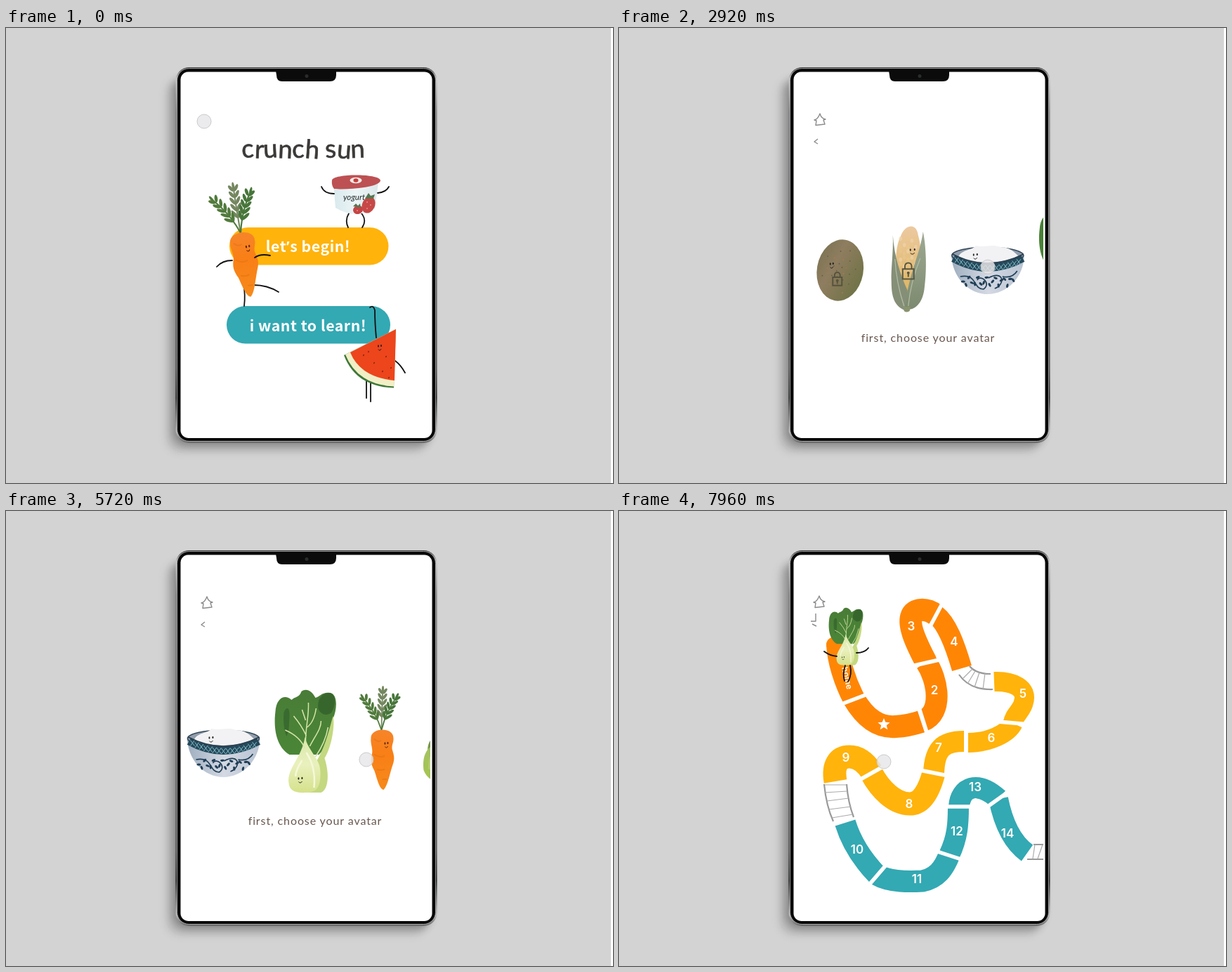
An HTML page that plays this animation: 864x648 px, repeating every 8000 ms.

```html
<!DOCTYPE html>
<html lang="en">
<head>
<meta charset="utf-8">
<style>
html, body { margin: 0; width: 100%; height: 100%; overflow: hidden; background: #d3d3d3; }
svg { display: block; width: 100vw; height: 100vh; }
.line { fill: none; stroke: #111; stroke-width: 1.8; stroke-linecap: round; stroke-linejoin: round; }
.icon { fill: none; stroke: #8b8b8b; stroke-width: 1.4; stroke-linejoin: round; }
.title { font: 400 36.5px Lato, sans-serif; fill: #3c3a39; stroke: #3c3a39; stroke-width: .7; }
.button { font: 700 21.3px "Noto Sans CJK SC", "Noto Sans CJK JP", "Noto Sans CJK", "Open Sans", sans-serif; letter-spacing: .5px; fill: #fff; text-anchor: middle; }
.mark { font-family: "Open Sans", sans-serif; }
.prompt { font: 400 16px Lato, sans-serif; letter-spacing: .9px; fill: #68574f; text-anchor: middle; }
.num { font: 600 17px Inter, sans-serif; fill: #fff; text-anchor: middle; }
</style>
</head>
<body>
<svg id="stage" viewBox="0 0 864 648" preserveAspectRatio="none"></svg>
<script>
const LOOP = 8000;
const path = (d, fill, more = "") => `<path d="${d}" fill="${fill}" ${more}/>`;
const stroke = (d, color, width, more = "") =>
  `<path d="${d}" fill="none" stroke="${color}" stroke-width="${width}" ${more}/>`;
const line = d => `<path class="line" d="${d}"/>`;
const icon = d => `<path class="icon" d="${d}"/>`;
const oval = (x, y, rx, ry, fill, turn = 0, more = "") =>
  `<ellipse cx="${x}" cy="${y}" rx="${rx}" ry="${ry}" fill="${fill}" transform="rotate(${turn} ${x} ${y})" ${more}/>`;
const group = (id, content, transform = "") => `<g id="${id}" transform="${transform}">${content}</g>`;
const text = (cls, x, y, words, more = "") => `<text class="${cls}" x="${x}" y="${y}" ${more}>${words}</text>`;
const gradient = (id, stops, dir = 'x2="0" y2="1"') => `<linearGradient id="${id}" ${dir}>` +
  stops.map(([at, color]) => `<stop offset="${at}" stop-color="${color}"/>`).join("") + "</linearGradient>";

const face = (x, y, gap = 5, color = "#222") =>
  oval(x, y, 1, 1.7, color) + oval(x + gap, y - .6, 1, 1.7, color) +
  stroke(`M${x} ${y + 4.5}q${gap / 2} 3.5 ${gap} -.5`, color, 1);
const lock = (x, y, s, color) =>
  stroke(`M${x - s} ${y - s * .6}h${2 * s}v${s * 1.8}h${-2 * s}zM${x - s * .6} ${y - s * .6}v${-s * .5}a${s * .6} ${s * .6} 0 0 1 ${s * 1.2} 0v${s * .5}M${x} ${y + s * .2}v${s * .6}`, color, 2) +
  oval(x, y + s * .1, 2, 2, color);

// A stem from the origin to (x, y) with pairs of narrow leaves along it.
function sprig(x, y, color) {
  const heading = Math.atan2(y, x) * 180 / Math.PI;
  let out = stroke(`M0 0Q${x * .3} ${y * .55} ${x} ${y}`, color, 1.8);
  for (let i = 0; i < 5; i++) {
    const t = .3 + i * .14;
    const px = 2 * t * (1 - t) * x * .3 + t * t * x;
    const py = 2 * t * (1 - t) * y * .55 + t * t * y;
    for (const side of [-1, 1]) {
      const turn = heading + side * 33, a = turn * Math.PI / 180;
      out += oval(px + 6 * Math.cos(a), py + 6 * Math.sin(a), 6.3 - i * .4, 2, color, turn);
    }
  }
  return out + oval(x, y, 5, 1.6, color, heading);
}

const carrot = id =>
  group(id, sprig(2, -58, "#74875f") + sprig(-27, -47, "#517b3c") + sprig(22, -48, "#47763a")) +
  path("M-15 12C-16-4 17-5 17 11C18 18 13 22 16 30C20 42 17 46 14 56C10 70 8 80 3 85C-3 84-6 70-10 58C-14 50-16 45-14 36C-11 28-16 20-15 12Z", "url(#carrotSkin)") +
  stroke("M-10 35q8 5 14 2M-6 56q6 2 10 0M2 70h5M-10 13q5 5 9 2", "#dc6f12", 2, 'opacity=".45" stroke-linecap="round"') +
  face(5, 19, 4, "#5a2410");

const bokChoy =
  path("M488 347C466 334 466 302 468 286C469 267 481 260 491 269C496 264 502 266 505 257C512 252 520 256 525 266C532 264 535 257 546 259C557 261 556 282 550 296C550 315 545 333 530 347Z", "url(#leaf)") +
  path("M529 282C527 267 535 259 546 259C556 262 553 281 547 288C540 292 533 290 529 282Z", "#37662d") +
  path("M480 287c4-10 9-7 8 7c-1 14 0 18-4 27c-4-9-5-23-4-34Z", "#396a2f") +
  path("M526 357C537 340 543 318 550 292C553 302 549 335 538 352C545 373 544 397 533 401H510Z", "#c3d880") +
  path("M487 387C484 367 506 351 510 322C515 342 532 353 532 371C533 394 526 401 512 401C495 402 488 398 487 387Z", "url(#stalk)") +
  stroke("M511 330C511 306 516 292 515 273M512 320Q505 305 494 292M513 308Q523 301 526 281M510 338Q503 321 482 312M517 335C526 318 533 310 533 299M525 350Q539 330 543 308M511 298L506 283", "#d6e5a9", 1.5) +
  stroke("M512 344Q526 365 523 394M506 355Q496 371 497 378", "#f5f8d9", 2.5) +
  face(501, 381, 5);

const potato =
  oval(325, 345, 33, 44, "url(#potatoSkin)", 10) +
  [...Array(24)].map((_, i) => oval(325 + (i + 3) * Math.sin(i * 2.4), 345 + 1.35 * (i + 3) * Math.cos(i * 2.4), .9, .9, i % 3 ? "#675d43" : "#b07752")).join("") +
  face(311, 336, 4) + lock(321, 359, 6.5, "#57533f");

const corn =
  path("M411 297C417 279 434 277 436 295C443 318 440 350 431 380H412C402 350 402 314 411 297Z", "url(#cornSkin)") +
  [...Array(30)].map((_, i) => oval(411 + i % 5 * 5.4, 300 + (i / 5 | 0) * 9 + i % 2 * 3, 2.4, 3, i % 3 ? "#e9c88c" : "#f1d6af", 0, 'opacity=".6"')).join("") +
  path("M400 295C402 325 411 352 421 374L420 403C402 398 398 382 398 362C397 342 401 322 400 295Z", "#858f78") +
  path("M443 290C439 322 422 350 417 401C433 403 443 390 445 370C449 342 447 309 443 290Z", "url(#husk)") +
  path("M415 397h10l-1 6q-5 3-8 0Z", "#89936f") +
  stroke("M439 328Q425 363 422 396M403 329Q405 363 416 396", "#b4bda4", 1.2) +
  face(425, 316, 6) + lock(422, 348, 8, "#59563f");

function makeBowl() {
  let lattice = "", flowers = "";
  for (let i = 0; i < 15; i++) {
    const x = 488 + i * 6.3, y = 329 + 13 * (1 - ((x - 535) / 50) ** 2);
    lattice += `M${x} ${y - 4}l6 8m0-8l-6 8`;
  }
  for (let i = 0; i < 18; i++) {
    const x = 500 + i * 4.2, y = 361 + 6 * Math.sin(i * 2.2);
    flowers += oval(x, y, 3, 1.6, "#203e56", i * 67);
  }
  return path("M483.5 323C484 354 507 379 535 379C563 379 587 354 587 323Z", "url(#china)") +
    oval(535, 324, 51, 12, "#929dab", 0, 'stroke="#34495a" stroke-width="1.5"') +
    path("M493 327C497 315 513 317 518 310C531 313 541 307 553 312C566 312 573 319 579 325Q535 342 493 327Z", "#f2f2f4") +
    stroke("M486 328Q535 355 585 328", "#25495a", 11) +
    stroke(lattice, "#84bdcc", 1) +
    stroke("M485 322Q535 348 586 322", "#263c4d", 1.5) +
    stroke("M496 354C520 349 514 372 529 372C541 364 525 350 520 359M536 356C559 344 560 366 545 371M556 354Q570 357 577 346", "#203e56", 1.7) +
    flowers + face(515, 323, 5);
}

const lettuce =
  path("M418 345C416 330 424 319 437 319C447 312 457 316 463 315C474 312 482 319 490 322C494 334 490 350 480 365H425Z", "#78994b") +
  path("M412 369C409 344 421 329 437 335C448 324 464 335 464 350C471 333 488 327 496 336C506 348 511 356 507 366C500 382 484 388 462 388C443 389 420 390 412 369Z", "url(#cabbage)") +
  path("M474 352C486 331 500 336 499 351C513 357 507 371 495 376L466 381Z", "#c9dc6c") +
  path("M419 367Q418 337 438 340Q449 353 443 385Z", "#bdd27b", 'opacity=".8"') +
  stroke("M434 382Q440 358 434 342M440 365L426 352M443 372L460 356M461 387Q456 370 485 357M470 379L491 371M451 386Q453 376 465 370M446 329L450 317", "#dce9aa", 1.2) +
  face(467, 353, 4);

const tomato =
  oval(585, 351, 43, 35, "url(#tomatoSkin)") +
  path("M584 320C574 318 566 320 559 327C566 327 572 326 578 323L569 333L584 325L595 333L592 323L609 326C602 317 594 317 588 318L594 304L583 316L579 308Z", "#48614f") +
  face(584, 350, 9);

const melon =
  path("M555 429L481 466Q498 511 552 512.500Z", "#3d7838") +
  path("M555 429L483 465Q500 508 552.500 510.500Z", "#f1efc6") +
  path("M555 429L490 462Q504 497 553 502Z", "#ed451c") +
  [[509, 466], [524, 477], [541, 468], [536, 489], [548, 484], [516, 461], [545, 498]].map(([x, y]) => oval(x, y, .7, 1.2, "#66200f", 25)).join("") +
  face(530, 453, 4);

const yogurt =
  path("M466 220L469 256Q497 273 525 257L530 220Z", "url(#cup)") +
  path("M464 217C465 207 531 207 533 217C533 227 485 231 467 229Q463 224 464 217Z", "#bd5053") +
  oval(498, 217, 8.5, 4.2, "#f5e8e2") + oval(498, 217, 3.5, 2.8, "#c33e3e") +
  `<text x="480" y="245" style="font:italic 400 11.5px Lato,sans-serif" fill="#252a2d">yogurt</text>` +
  oval(501, 259, 7, 6, "#c64444", -15) + oval(516, 252, 9, 12, "#c74947", 25) +
  path("M511 243l5-8 3 4 6-2-2 6ZM494 254l4-4 3 3 3-3 1 6Z", "#587652") +
  [[514, 248], [519, 252], [514, 257], [500, 260]].map(([x, y]) => oval(x, y, .7, 1, "#efb1a6")).join("");

const home =
  text("title", 336, 185, "crunch sun", 'rotate="-4 3 -3 2 -2 4 0 -3 4 -2"') +
  `<rect x="318" y="284" width="226.500" height="53.500" rx="26.700" fill="#ffb30b"/>` +
  `<rect x="314" y="396" width="233" height="53.500" rx="26.700" fill="#33a9b3"/>` +
  text("button", 430, 318.5, `let<tspan class="mark">’</tspan>s begin!`) + text("button", 430, 431.5, "i want to learn!") +
  line("M488 264Q482 274 487 284M506 264Q514 274 507 284") + group("yogurt", yogurt) +
  group("arms", line("M467 236Q453 236 449 226M529 235Q541 234 545 226")) +
  line("M338 365Q341 380 339 396M352 366Q372 366 388 376M322 331Q308 331 300 340") +
  `<g transform="translate(334 292) rotate(-7) scale(1.1 1.08)">${carrot("tops")}</g>` +
  line("M354 327Q362 321 376 324") +
  line("M513 503V527M519 505V532M554 474Q562 480 568 491") + melon +
  line("M527 441Q525 420 525 402Q523 394 518 398");

const HOUSE = "M286 122Q283 130 278 131L281 132L280 138.500L293 137L291 131L294 130Q288 129 286 122Z";
const row = [potato, corn, makeBowl(), `<g transform="translate(141 0)">${bokChoy}</g>`,
  `<g transform="translate(760 312)">${carrot("rowTops")}</g>`,
  `<g transform="translate(408 0)">${lettuce}</g>`, `<g transform="translate(408 0)">${tomato}</g>`];
const picker = icon(HOUSE) + icon("M283 158L278 162L283 165") +
  text("prompt", 440, 447, "first, choose your avatar") +
  `<g clip-path="url(#inner)">${group("row", row.map((r, i) => group("item" + i, r)).join(""))}</g>`;

const ORANGE = "#ff8605", YELLOW = "#ffb30b", TEAL = "#33a9b3";
const tiles = [
  [ORANGE, 32, "M311 190C312 212 321 242 334 267C351 296 370 309 394 307Q412 306 430 300"],
  [ORANGE, 31, "M437 215C454 240 462 288 432 299"],
  [ORANGE, 32, "M437 215C424 190 412 165 416 151C419 138 438 138 451 148"],
  [ORANGE, 29, "M451 148C467 160 478 190 488 224"],
  [YELLOW, 28, "M534 243C560 242 582 252 576 272C574 284 562 290 561 302"],
  [YELLOW, 28, "M561 302C553 318 525 330 497 330"],
  [YELLOW, 30, "M491 328C462 328 449 338 448 374"],
  [YELLOW, 33, "M448 373C441 400 430 417 414 417C392 417 372 397 359 373"],
  [YELLOW, 33, "M308 385C304 362 312 350 328 350C340 350 351 358 360 372"],
  [TEAL, 30, "M322 444C330 470 345 495 367 518"],
  [TEAL, 31, "M367 518C386 529 415 528 432 527C452 523 462 510 470 490"],
  [TEAL, 30, "M470 490C482 465 483 445 483 421"],
  [TEAL, 30, "M484 421C486 393 510 383 540 410"],
  [TEAL, 28, "M540 410C547 445 560 472 581 487"]
];
const gaps = "M314 276L356 260M427 280L439 318M416 221L460 211M443 164L460 132M539 300L586 304M494 310V348M428 369L468 377M344 382L376 364M352 537L382 502M450 484L490 497M464 421H504M526 420L554 400";
const labels = [[449, 261, 2], [416, 170, 3], [477, 192, 4], [575, 266, 5], [530, 329, 6], [455, 343, 7], [413, 423, 8],
  [323, 357, 9], [339, 488, 10], [424, 530, 11], [481, 462, 12], [507, 399, 13], [553, 465, 14]];
const star = "M" + [...Array(10)].map((_, i) => {
  const r = i % 2 ? 4 : 9, a = i * Math.PI / 5;
  return `${377 + r * Math.sin(a)} ${304 - r * Math.cos(a)}`;
}).join("L") + "Z";
const board =
  oval(311, 190, 16, 12, ORANGE) +
  tiles.map(([color, width, d]) => stroke(d, color, width)).join("") +
  stroke(gaps, "#fff", 5.5) + path(star, "#fff") +
  labels.map(([x, y, n]) => text("num", x, y, n)).join("") +
  `<text transform="translate(317 223) rotate(77)" style="font:600 12px Inter,sans-serif" fill="#fff">home</text>` +
  `<g clip-path="url(#inner)">` +
  stroke("M484 233Q499 255 532 254M499 221Q508 232 529 232M292 389Q295 420 305 442M324 389Q326 415 334 436M590 475H606M581 496H606", "#999", 2.2) +
  stroke("M489 239L503 225M496 246L507 228M506 251L513 230M518 254L521 231M293 390H324M293 401L325 399M296 413L327 409M299 425L330 421M303 437L333 432M589 495L592 475M596 495L603 475", "#aaa", 1.2) + "</g>" +
  `<g transform="translate(-1 -1)">${icon(HOUSE)}</g>` + icon("M280 146V157H273M275 161L281 164") +
  `<g transform="translate(37 -5) scale(.56)">${bokChoy}</g>` +
  line("M310 207Q300 206 292 200M338 202Q350 202 355 195M322 220Q318 232 321 242M329 220Q332 233 326 243");

const defs = "<defs>" +
  gradient("metal", [[0, "#333"], [.03, "#c8c8ca"], [.12, "#808083"], [.8, "#4c4c4f"], [.88, "#1c1d1e"], [.97, "#bbb"], [1, "#666"]]) +
  gradient("carrotSkin", [[0, "#f6852a"], [.4, "#f97f16"], [1, "#f68a1b"]]) +
  gradient("leaf", [[0, "#497c37"], [1, "#4a8637"]]) +
  gradient("stalk", [[0, "#d9e8ac"], [.5, "#e9f0bd"], [1, "#d5e18b"]]) +
  gradient("potatoSkin", [[0, "#777250"], [.45, "#8f7d60"], [1, "#737449"]], 'x2="1" y2=".5"') +
  gradient("cornSkin", [[0, "#ecc9a0"], [1, "#ddb561"]]) +
  gradient("husk", [[0, "#9fa993"], [1, "#7c8a6f"]]) +
  gradient("china", [[0, "#9eaebf"], [.5, "#d4d9e3"], [1, "#b9c3d2"]], 'x2="1" y2="0"') +
  gradient("cabbage", [[0, "#a4c166"], [1, "#a5c64c"]]) +
  gradient("tomatoSkin", [[0, "#a5614f"], [.5, "#89453d"], [1, "#713932"]], 'x2="1" y2=".6"') +
  gradient("cup", [[0, "#d8e9ed"], [.5, "#edf5f6"], [1, "#dce8eb"]], 'x2="1" y2="0"') +
  `<clipPath id="inner"><rect x="254" y="80" width="350" height="490"/></clipPath>` +
  `<filter id="blur" x="-20%" y="-20%" width="140%" height="140%"><feGaussianBlur stdDeviation="6"/></filter></defs>`;
const tablet =
  `<rect width="861" height="648" fill="#d3d3d3"/><rect x="861" width="3" height="648" fill="#fff"/>` +
  `<rect x="228" y="72" width="372" height="532" rx="20" fill="#555" opacity=".2" filter="url(#blur)"/>` +
  `<rect x="237" y="72" width="368" height="523" rx="20" fill="#444" opacity=".45" filter="url(#blur)"/>` +
  `<rect x="241.500" y="56" width="372" height="535" rx="19" fill="url(#metal)"/>` +
  `<rect x="243.500" y="57.500" width="368" height="531" rx="17" fill="#090909" stroke="#bbb" stroke-width=".8"/>` +
  `<rect x="248.500" y="62.500" width="358" height="521.500" rx="11" fill="#fff"/>`;
const notch = path("M384 61H470V67Q470 76 461 76H393Q385 76 385 67Z", "#0b0b0b") + oval(428, 68.5, 2.5, 2.5, "#292b2d");
const stage = document.getElementById("stage");
stage.innerHTML = defs + tablet + group("home", home) + group("picker", picker) + group("board", board) + notch +
  `<circle id="pointer" r="10" fill="#e7e6e8" fill-opacity=".84" stroke="#cbcacc" stroke-width="1"/>`;

const find = id => document.getElementById(id);
const parts = Object.fromEntries(["home", "picker", "board", "yogurt", "arms", "tops", "row", "pointer"].map(id => [id, find(id)]));
const items = row.map((_, i) => find("item" + i));
const clamp = v => Math.max(0, Math.min(1, v));
const smooth = v => v * v * (3 - 2 * v);

// Each step is [time, ...values].
function follow(steps, t) {
  const next = steps.findIndex(step => step[0] > t);
  if (next < 0) return steps[steps.length - 1].slice(1);
  if (next === 0) return steps[0].slice(1);
  const a = steps[next - 1], b = steps[next], p = smooth((t - a[0]) / (b[0] - a[0]));
  return a.slice(1).map((v, i) => v + (b[i + 1] - v) * p);
}
const pointerSteps = [[900, 282, 133], [1200, 290, 158], [1600, 430, 312], [2080, 390, 320], [2700, 535, 340],
  [4040, 397, 342], [4920, 365, 348], [5400, 566, 352], [6440, 332, 361], [6560, 332, 361], [7100, 450, 358], [7350, 377, 357]];
const fadeSteps = [[900, 1], [1200, .55], [1600, .55], [1900, 1]];
const rowSteps = [[2700, 0], [4040, -141], [4920, -172], [5400, -172], [6440, -408], [6560, -408], [7100, -275]];

function draw(t) {
  const show = (part, on) => part.style.display = on ? "" : "none";
  show(parts.home, t < 1720);
  show(parts.picker, t >= 1720 && t < 7520);
  show(parts.board, t >= 7520);

  const sway = (1 - Math.cos(Math.PI * t / 1200)) / 2;
  parts.tops.setAttribute("transform", `rotate(${-4 - 5 * sway}) scale(1.05 1.08)`);
  parts.yogurt.setAttribute("transform", `translate(0 ${2 * sway})`);
  parts.arms.setAttribute("transform", `translate(${497 * .08 * sway} ${-3 * sway}) scale(${1 - .08 * sway} 1)`);

  parts.row.setAttribute("transform", `translate(${follow(rowSteps, t)[0]} 0)`);
  items.forEach((item, i) => {
    const p = clamp((t - 1720 - 75 * i) / 900);
    item.setAttribute("transform", `translate(0 ${100 * (1 - p) ** 3})`);
    item.style.opacity = clamp(p * 5);
  });

  const [x, y] = follow(pointerSteps, t);
  parts.pointer.setAttribute("transform", `translate(${x} ${y})`);
  parts.pointer.setAttribute("opacity", follow(fadeSteps, t)[0]);
}

const start = performance.now();
function tick() {
  draw((performance.now() - start) % LOOP);
  requestAnimationFrame(tick);
}
tick();
</script>
</body>
</html>
```
